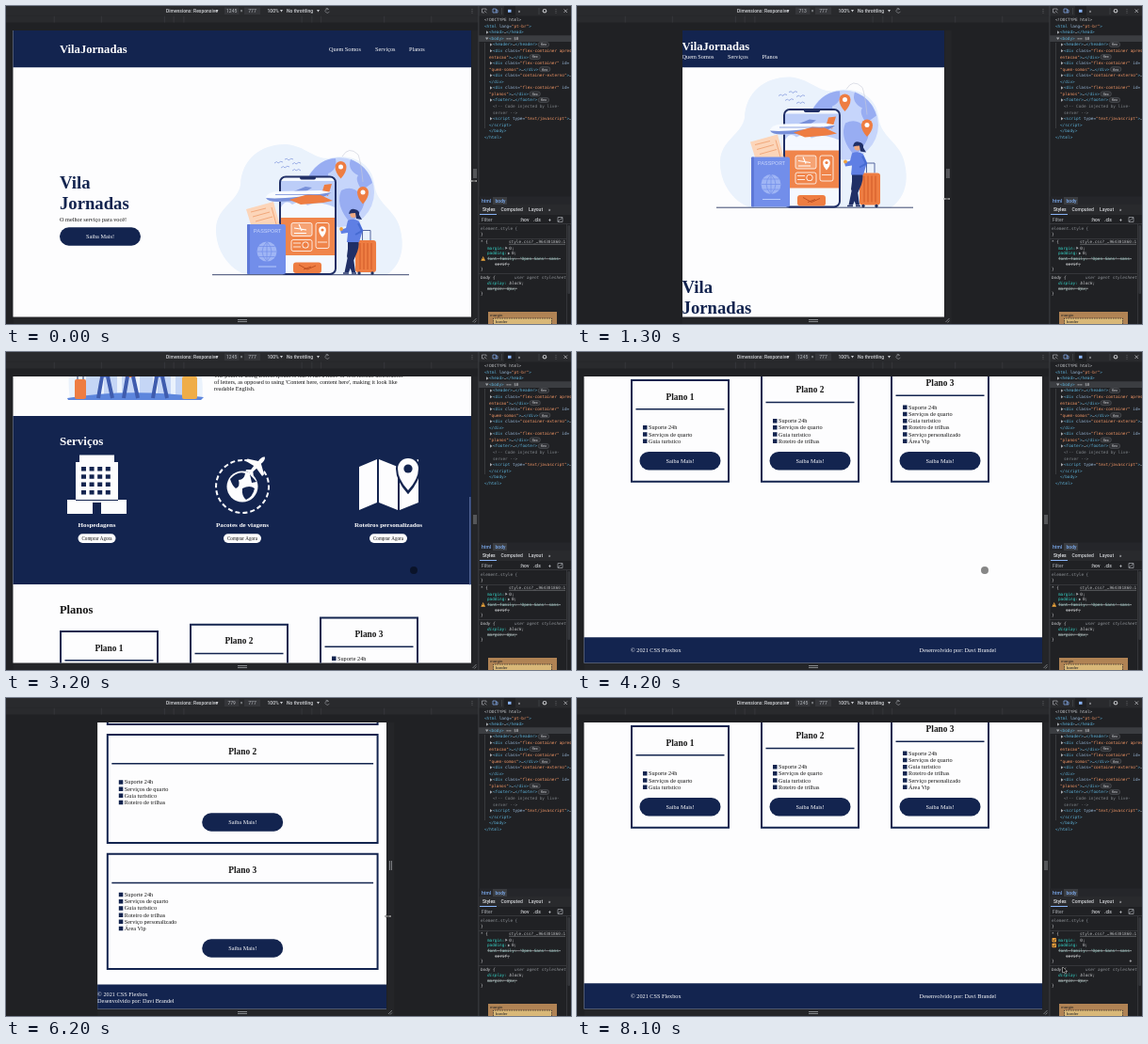
These frames come from a looping animation (600 by 338 pixels, 8200 ms). An HTML page with a canvas:

```html
<!DOCTYPE html>
<html lang="pt-br">
<head>
<meta charset="utf-8">
<title>Layout responsivo</title>
<style>
html, body { margin: 0; width: 100%; height: 100%; overflow: hidden; background: #202124; }
canvas { display: block; }
</style>
</head>
<body>
<canvas id="stage" width="600" height="338"></canvas>
<script>
const ctx = document.getElementById('stage').getContext('2d');
const LOOP = 8200, STEP = 100, CENTER = 251, SCALE = 0.3912, BREAKPOINT = 1000;
const NAVY = '#13244f', WHITE = '#fdfdfe', BLACK = '#151515', ORANGE = '#ee7d42', INK = '#202f66';
const SERIF = '"Liberation Serif", serif', SANS = 'Roboto, sans-serif', MONO = '"DejaVu Sans Mono", monospace';

// Keys: [time, value, ...]
const WIDTHS = [[0, 1245], [150, 1245], [1270, 713], [1350, 713], [2300, 1245], [5000, 1245], [6200, 779], [6450, 690], [7400, 1245], [8200, 1245]];
const SCROLL = [[0, 0], [2700, 0], [3200, 414], [3550, 681], [8200, 681]];
const POINTER = [[0, 497, 186], [1300, 393, 205], [2300, 497, 221], [2500, 492, 222], [2700, 433, 232], [4400, 433, 232], [5000, 497, 232], [7400, 497, 232], [8000, 516, 288], [8200, 516, 288]];

function at(keys, t) {
  const i = Math.max(1, keys.findIndex(k => k[0] > t));
  const a = keys[i - 1], b = keys[i], p = Math.max(0, (t - a[0]) / (b[0] - a[0]));
  return a.slice(1).map((v, n) => v + (b[n + 1] - v) * p);
}

function rect(x, y, w, h, color, r = 0) {
  ctx.fillStyle = color;
  ctx.beginPath();
  ctx.roundRect(x, y, w, h, r);
  ctx.fill();
}
function frame(x, y, w, h, color, lw = 1, r = 0) {
  ctx.strokeStyle = color;
  ctx.lineWidth = lw;
  ctx.beginPath();
  ctx.roundRect(x, y, w, h, r);
  ctx.stroke();
}
function disc(x, y, r, color) {
  ctx.fillStyle = color;
  ctx.beginPath();
  ctx.arc(x, y, r, 0, 7);
  ctx.fill();
}
function fill(d, color) {
  ctx.fillStyle = color;
  ctx.fill(new Path2D(d));
}
function line(d, color, lw = 1) {
  ctx.strokeStyle = color;
  ctx.lineWidth = lw;
  ctx.stroke(new Path2D(d));
}
// y is the visual middle of the line
function text(s, x, y, size, color, font = SERIF, align = 'left', style = '') {
  ctx.font = `${style} ${size}px ${font}`;
  ctx.textAlign = align;
  ctx.fillStyle = color;
  ctx.fillText(s, x, y + size * 0.32);
}
const copy = (s, x, y, color = BLACK, align) => text(s, x, y, 6.26, color, SERIF, align);
const bold = (s, x, y, size, color, align) => text(s, x, y, size, color, SERIF, align, 'bold');
const ui = (s, x, y, color = '#d3d5d9', align) => text(s, x, y, 5, color, SANS, align, '500');
const mono = (s, x, y, color, style) => text(s, x, y, 4.35, color, MONO, 'left', style);

function pin(x, y, r, color, hole) {
  fill(`M${x - r} ${y}A${r} ${r} 0 1 1 ${x + r} ${y}Q${x + r} ${y + r} ${x} ${y + r * 2.1}Q${x - r} ${y + r} ${x - r} ${y}`, color);
  disc(x, y, r * 0.42, hole);
}
function button(cx, cy, w = 86) {
  rect(cx - w / 2, cy - 9.7, w, 19.4, NAVY, 9.7);
  copy('Saiba Mais!', cx, cy, WHITE, 'center');
}

function travelArt(dx, dy) {
  ctx.save();
  ctx.translate(dx, dy);
  fill('M256 286C236 280 222 258 223 236C224 214 246 208 249 190C250 162 272 146 298 147C318 149 326 162 342 162C366 156 388 166 391 188C393 210 410 214 417 232C424 252 422 274 404 286Z', '#eaf2fc');
  line('M219 285.7H428', '#26335f', 0.9);
  disc(354, 198, 37, '#c6d5fb');
  fill('M322 180Q334 162 350 162Q352 174 342 178Q344 188 332 192Q326 190 322 180M366 163Q384 170 389 188L378 196Q370 184 374 180Q362 174 366 163M356 196Q368 190 376 200Q386 206 374 222Q366 234 362 226Q350 210 356 196', '#98adf2');
  line('M357 160Q364 148 374 158Q377 166 379 187', '#c8ccd8', 0.6);
  pin(355.5, 171, 6, ORANGE, WHITE);
  pin(379, 198, 6, ORANGE, WHITE);
  line('M285 167q3 -3 4 0q3 -3 5 -1M296 163q3 -2 4 1q3 -3 5 -1M292 172q3 -3 4 0q3 -3 5 -1M304 168q3 -3 4 0q3 -3 5 -1M304 175q3 -3 4 0q3 -3 5 0', '#7c93dc', 0.7);

  rect(291, 181, 59, 104, '#f4f8ff', 6);
  rect(292, 186, 57, 28, '#bccdf8');
  fill('M292 214Q297 205 304 211Q313 205 320 212Q332 206 349 214V220H292Z', '#f4f8ff');
  rect(292, 225, 57, 40, '#f0854b');
  frame(291, 181.5, 59, 103.5, INK, 2, 6);
  rect(312, 181, 17, 3.5, INK, 1.7);
  rect(303, 230.5, 22, 14, '#f6a374', 2);
  frame(303, 230.5, 22, 14, '#fff', 0.8, 2);
  line('M306 236l13 2M311 232l3 7M306 241.5h13', '#fff', 1.1);
  frame(329, 230.5, 14, 27, '#fff', 0.8, 2);
  pin(336, 238, 3.8, '#fff', ORANGE);
  line('M331 251h10', '#fff', 0.8);
  frame(303, 248.5, 22, 12, '#fff', 0.8, 2);
  disc(318, 254, 3.5, '#fff');
  disc(318, 254, 2.7, ORANGE);
  line('M305 252h8M305 256h8', '#fff', 0.8);
  rect(305, 272.5, 30, 11.5, ORANGE, 3);
  line('M311 275l9 5l9 -4M316 280l8 -3', '#b94c20', 0.9);

  // airliner, nose to the left
  fill('M335 200L338 190L346 189L342 202Z', ORANGE);
  fill('M303 198L318 192L325 193L314 200Z', '#7890da');
  fill('M276 203Q278 198 288 197L334 196L346 198Q338 205 318 207L288 208Q277 208 276 203Z', '#f8fbff');
  fill('M276 204Q296 206 346 198Q338 205 318 207L288 208Q278 208 276 204Z', '#7890da');
  fill('M301 206L321 200L334 201L347 207L337 209L313 211Z', ORANGE);
  line('M286 200.5H332', '#7890da', 0.8);

  fill('M255 216L284 208L291 234L263 242Z', '#fcd5b9');
  line('M260 219l16 -4M262 224l18 -5M282 214l5 18M265 229l18 -5', '#ee9c6b', 0.8);
  rect(256, 232, 41, 53, '#728eea', 2);
  rect(256, 232, 3, 53, '#5d78d7', 1);
  text('PASSPORT', 277.5, 239, 6, '#c5d3fb', SANS, 'center');
  disc(277, 261, 10.5, '#9fb5f5');
  line('M266.5 261h21M277 250.5v21M268.5 255.5h17M268.5 266.5h17M277 250.5q-10 10.5 0 21q10 -10.5 0 -21', '#728eea', 0.7);
  line('M268 277h19', '#b8cbfb', 1);

  line('M378.5 249V238.5H387V249', '#55679f', 1);
  rect(371, 249, 22, 34, ORANGE, 3);
  line('M376 252v28M380 252v28M384 252v28M388 252v28', '#c95222', 0.8);
  disc(375, 284, 1.7, '#26335f');
  disc(389, 284, 1.7, '#26335f');
  fill('M363 249H374Q376 256 371 266L364 283H359.5L363 266ZM364 250H372L369 268L371 283H367L362 266Z', INK);
  fill('M363 228Q369 225 375 229L379 238L375 251H362L363 241L356 242L355 238L361 236Z', '#5f7fe4');
  line('M374 231L378 239L371 243', '#466bd2', 2);
  disc(369, 221.5, 3.6, '#efa981');
  fill('M364 221Q365 215 370 216Q376 217 375 222L378 227L372 226L371 220Q367 220 364 221Z', INK);
  disc(356, 237, 1.9, '#f0a33c');
  line('M358 284h6M367 284h5', INK, 1.7);
  ctx.restore();
}

function aboutSection() {
  bold('Quem Somos', 57, 377, 12.5, NAVY);
  fill('M68 465Q60 410 96 396Q138 380 176 398Q214 420 208 465Z', '#eaf2fc');
  for (let i = 0; i < 6; i++) rect(85 + i * 19, 422 - (i * 13) % 23, 14, 40 + (i * 13) % 23, '#c5d6f6');
  fill('M65 463Q130 452 210 462L207 465H66Z', '#5d86dd');
  rect(73, 443, 12, 21, ORANGE, 2);
  rect(187, 440, 16, 24, '#efad47', 2);
  line('M76 443v-8h6v8M190 440v-8h9v8', '#26335f', 1);
  for (const [x, shirt] of [[105, '#5f7fe4'], [132, ORANGE], [163, '#5f7fe4']]) {
    disc(x, 410, 5, '#efa981');
    rect(x - 7, 416, 14, 25, shirt, 4);
    line(`M${x - 3} 440l-4 23M${x + 3} 440l5 23`, '#3f5cae', 4);
  }
  ["It is a long established fact that a reader will be distracted by the readable",
   'content of a page when looking at its layout.',
   'The point of using Lorem Ipsum is that it has a more-or-less normal distribution',
   "of letters, as opposed to using 'Content here, content here', making it look like",
   'readable English.'
  ].forEach((s, i) => copy(s, 221, 424 + i * 7.3));
}

function servicesSection(L, w) {
  ctx.save();
  ctx.translate(0, 414);
  rect(L, 68, w, 179, NAVY);
  bold('Serviços', 57, 95, 13, WHITE);

  rect(78, 109.5, 37, 9, WHITE);
  rect(74, 117, 45, 42, WHITE);
  rect(65, 157, 63, 15, WHITE);
  for (let i = 0; i < 16; i++) rect(80 + (i % 4) * 8.6, 122 + (i >> 2) * 8.3, 5, 4.5, NAVY);
  rect(92, 160, 9, 12, NAVY);
  line('M74 157.5H119', NAVY, 1);

  ctx.setLineDash([5, 3]);
  line('M251 115a28 28 0 1 0 .1 0', WHITE, 2);
  ctx.setLineDash([]);
  disc(251, 143, 16.5, WHITE);
  fill('M238 135q8 -9 16 -6q-1 7 -7 7q2 7 -3 9q-4 -3 -6 -10M251 145q8 -4 13 0q-2 9 -9 12q-5 -4 -4 -12M259 130l7 8l-5 1z', NAVY);
  ctx.save();
  ctx.translate(266, 121);
  ctx.rotate(0.75);
  disc(0, 0, 10, NAVY);
  fill('M0 -13Q3 -11 2 -5L12 1V4L2 2L1.5 7L5 10V12L0 10.5L-5 12V10L-1.5 7L-2 2L-12 4V1L-2 -5Q-3 -11 0 -13', WHITE);
  ctx.restore();

  fill('M375 122L394 114V160L375 168ZM396 114L416 122V168L396 160ZM418 122L438 114V160L418 168Z', WHITE);
  pin(427, 124, 13, NAVY, NAVY);
  pin(427, 124, 11, WHITE, NAVY);

  [['Hospedagens', 96.5], ['Pacotes de viagens', CENTER], ['Roteiros personalizados', 406]].forEach(([s, x]) => {
    bold(s, x, 184, 7.1, WHITE, 'center');
    rect(x - 20, 193.3, 40, 9.6, WHITE, 4.8);
    text('Comprar Agora', x, 198, 5.1, BLACK, SERIF, 'center');
  });
  ctx.restore();
}

const PERKS = ['Suporte 24h', 'Serviços de quarto', 'Guia turistico', 'Roteiro de trilhas', 'Serviço personalizado', 'Área Vip'];

function planCard(n, x, bottom, w) {
  const count = [3, 4, 6][n - 1], cx = x + w / 2, last = bottom - 44;
  const first = last - (count - 1) * 7.2, top = first - (n === 3 ? 44.3 : 51.3);
  frame(x + 1, top + 1, w - 2, bottom - top - 2, NAVY, 2);
  bold('Plano ' + n, cx, top + 18.5, 9.4, BLACK, 'center');
  rect(x + 5.5, top + 31, w - 11, 1.5, NAVY);
  PERKS.slice(0, count).forEach((s, i) => {
    rect(x + 13, first + i * 7.2 - 2.2, 4.5, 4.5, NAVY);
    copy(s, x + 19, first + i * 7.2);
  });
  button(cx, bottom - 23, Math.min(86, w - 14));
}

function drawPage(w, mobile, scroll, thumb) {
  const L = CENTER - w / 2, R = CENTER + w / 2;
  ctx.save();
  ctx.beginPath();
  ctx.rect(Math.round(L), 26, Math.floor(R) - Math.round(L), 304.5);
  ctx.clip();
  rect(L, 26, w, 305, WHITE);
  ctx.save();
  ctx.translate(0, -scroll);

  rect(L, 26, w, 39.3, NAVY);
  bold('VilaJornadas', mobile ? L : L + 49.5, mobile ? 43 : 46.3, 12.6, WHITE);
  const navX = mobile ? [L, L + 48.5, L + 85] : [R - 151.5, R - 102.5, R - 66.5];
  ['Quem Somos', 'Serviços', 'Planos'].forEach((s, i) => copy(s, navX[i], mobile ? 53.5 : 46, WHITE));

  const x = mobile ? L : L + 49.5, dy = mobile ? 111 : 0;
  travelArt(mobile ? -71 : R - 494.5, mobile ? -71.5 : 0);
  bold('Vila', x, 188 + dy, 18.7, NAVY);
  bold('Jornadas', x, 210 + dy, 18.7, NAVY);
  copy('O melhor serviço para você!', x, 227 + dy);
  button(x + 43, 245 + dy);
  if (!mobile) {
    aboutSection();
    servicesSection(L, w);
    bold('Planos', L + 49.5, 688, 12.5, BLACK);
  }

  ctx.translate(0, 681);
  if (mobile) {
    [29, 155, 289].forEach((bottom, i) => planCard(i + 1, L + 9.7, bottom, w - 19));
    rect(L, 304.5, w, 27, NAVY);
  } else {
    const gap = Math.max(6, (w - 421) / 2), cardW = Math.min(105, (w - 106 - gap * 2) / 3);
    for (let i = 0; i < 3; i++) planCard(i + 1, L + 49.5 + i * (cardW + gap), 138.7, cardW);
    rect(L, 303.3, w, 28, NAVY);
  }
  copy('© 2021 CSS Flexbox', mobile ? L : L + 49.5, mobile ? 314.5 : 317, WHITE);
  copy('Desenvolvido por: Davi Brandel', mobile ? L : R - 49.5, mobile ? 322 : 317, WHITE, mobile ? 'left' : 'right');
  ctx.restore();
  if (thumb) rect(R - 2.5, 26 + scroll * 0.309, 1.5, 94, 'rgba(125,145,200,.6)');
  ctx.restore();
}

function drawFrameTools(w, css) {
  rect(0, 0, 600, 338, '#202124');
  rect(0, 10.5, 502, 7, '#292a2d');
  for (const s of [320, 375, 425, 768, 1024])
    for (const side of [-1, 1]) rect(CENTER + side * s * SCALE / 2, 10.5, 1, 7, '#36373b');
  rect(0, 0, 600, 10.5, '#292a2d');
  ui('Dimensions: Responsive', 170, 5.3);
  rect(232, 1.5, 15.5, 7.5, '#35363a');
  rect(253, 1.5, 17, 7.5, '#35363a');
  ui(Math.round(css), 239.7, 5.3, '#9fa2a7', 'center');
  ui('×', 250.2, 5.3, '#9fa2a7', 'center');
  ui('777', 261.5, 5.3, '#9fa2a7', 'center');
  ui('100%', 277.5, 5.3);
  ui('No throttling', 298, 5.3);
  for (const x of [222.5, 291, 330]) fill(`M${x} 4h3l-1.5 2.6z`, '#c9cbcf');
  line('M343 3.8a2.2 2.2 0 1 0 .3 2M339.7 2.3l2 .4l-.8 1.7', '#8b8e93', 0.7);
  ui('⋮', 495, 5.3, '#c9cbcf', 'center');

  const R = CENTER + w / 2;
  rect(R, 26, 7.5, 312, '#242528');
  rect(CENTER - w / 2, 331, w + 7.5, 7, '#242528');
  line(`M${R + 2.5} 173v10M${R + 4.5} 173v10`, '#a0a2a6', 0.8);
  line('M246 333.5h10M246 335.5h10', '#a0a2a6', 0.8);
  line(`M${R + 1} 336l4 -4M${R + 3} 336.5l2 -2`, '#a0a2a6', 0.7);
}

// [text, x, arrow, badge]
const TREE = [
  ['<!DOCTYPE html>', 508], ['<html lang="pt-br">', 508], ['<head>…</head>', 513, '▶'], ['<body> == $0', 513, '▼'],
  ['<header>…</header>', 517, '▶', 1], ['<div class="flex-container apres', 517, '▶'], ['entacao">…</div>', 513, '', 1],
  ['<div class="flex-container" id=', 517, '▶'], ['"quem-somos">…</div>', 513, '', 1],
  ['<div class="container-externo">…', 517, '▶'], ['</div>', 513],
  ['<div class="flex-container" id=', 517, '▶'], ['"planos">…</div>', 513, '', 1], ['<footer>…</footer>', 517, '▶', 1],
  ['<!-- Code injected by live-', 517], ['server -->', 517], ['<script type="text/javascript">…', 517, '▶'],
  ['<\/script>', 513], ['</body>', 513], ['</html>', 508]
];
const TOKEN = /(^[\w-]+"|"[^"]*"?)|( [\w-]+=)|(…| == \$0)|([^\s"…])/g;
const TOKEN_COLORS = ['#f29766', '#9bbbdc', '#c9cbcf', '#5db0d7'];

function drawTree() {
  rect(502, 31.3, 98, 6.6, '#3b3d41');
  line('M508.5 39V130', '#4b4d51', 0.6);
  TREE.forEach(([s, x, arrow, badge], i) => {
    const y = 14.9 + i * 6.55;
    if (/^<!|-->/.test(s)) mono(s, x, y, i ? '#80868b' : '#c9cbcf');
    else for (const m of s.matchAll(TOKEN)) mono(m[0], x + m.index * 2.62, y, TOKEN_COLORS[m.slice(1).findIndex(Boolean)]);
    if (arrow) fill(arrow === '▶' ? `M${x - 3} ${y - 1.7}l2.5 1.7l-2.5 1.7z` : `M${x - 4} ${y - 1}h3.4l-1.7 2.4z`, '#a8abb0');
    if (badge) {
      const end = x + s.length * 2.62 + 1;
      rect(end, y - 2.6, 11.5, 5, '#2f3034', 2.5);
      frame(end, y - 2.6, 11.5, 5, '#5f6267', 0.5, 2.5);
      text('flex', end + 5.7, y, 4, '#d3d5d9', SANS, 'center');
    }
  });
}

function drawStyles(mobile, hover) {
  const soft = '#8f9398', prop = '#35d4c7', value = '#d3d5d8';
  rect(502, 202.5, 98, 8.5, '#25262a');
  rect(517, 203, 15, 8, '#3b3d41');
  ui('html', 505, 207, '#7cacf0');
  ui('body', 519.5, 207, '#7cacf0');
  rect(502, 211, 98, 11, '#292a2d');
  ui('Styles', 506, 216.5, '#e8eaed');
  ui('Computed', 525.5, 216.5);
  ui('Layout', 555, 216.5);
  ui('»', 576, 216.5);
  rect(503, 221, 18, 1, '#8ab4f8');
  ui('Filter', 505, 227, soft);
  ui(':hov', 546, 227);
  ui('.cls', 560, 227);
  ui('+', 576, 227);
  frame(586, 224.5, 5, 5, '#a8abb0', 0.7);
  line('M586 229l5 -4', '#a8abb0', 0.7);
  line('M502 231.5H600M502 247.5H595M502 284.5H595', '#43454a', 0.6);
  line('M595.5 232V338', '#43454a', 0.6);
  rect(596.5, 233, 2.5, 73, '#36383c', 1);

  mono('element.style {', 504, 236.7, soft);
  mono('}', 504, 243, value);
  mono('* {', 504, 251, value);
  mono('style.css?_…964301860:1', 534, 251, '#b8babd');
  line('M534 253.3H594', '#b8babd', 0.4);
  ['margin', 'padding'].forEach((s, i) => {
    const y = 257.3 + i * 5.8, end = 511 + (s.length + 1) * 2.62;
    mono(s + ':', 511, y, prop);
    mono('0;', end + 5, y, value);
    if (hover) {
      rect(504.5, y - 2.3, 4.5, 4.5, '#f0a13a', 0.8);
      line(`M505.5 ${y}l1 1.2l1.7 -2.6`, '#202124', 0.7);
    } else fill(`M${end + 1} ${y - 1.5}l2.3 1.5l-2.3 1.5z`, '#a8abb0');
  });
  mono("font-family: 'Open Sans' sans-", 511, 268.7, '#8fc9c1');
  mono('serif;', 519, 274.3, value);
  line('M511 268.7H589M519 274.3H535', '#c0c2c5', 0.6);
  if (!mobile && !hover) {
    fill('M506.7 266l2.4 4.7h-4.8z', '#f2a93b');
    line('M506.7 267.5v1.6', '#202124', 0.6);
  }
  mono('}', 504, 280, value);
  if (hover) ui('+', 588, 279, '#c9cbcf', 'center');
  mono('body {', 504, 288.5, value, 'italic');
  mono('user agent stylesheet', 540, 288.5, soft, 'italic');
  mono('display:', 511, 294.7, prop, 'italic');
  mono('block;', 534.5, 294.7, value, 'italic');
  mono('margin: 8px;', 511, 300.3, '#a7c6c2', 'italic');
  line('M511 300.3H543', '#c0c2c5', 0.6);
  mono('}', 504, 306, value);

  rect(512, 325, 73, 13, '#b08354');
  text('margin', 514, 328.7, 4.3, '#202124', SANS);
  rect(517.5, 332, 62, 6, '#d9b878');
  ctx.setLineDash([1.5, 1]);
  line('M517.5 338V332H579.5V338', '#202124', 0.7);
  ctx.setLineDash([]);
  text('border', 520, 336, 4.3, '#202124', SANS);
}

function drawInspector(mobile, hover) {
  rect(501.5, 0, 98.5, 338, '#202124');
  rect(501.5, 0, 98.5, 10.5, '#292a2d');
  rect(501.5, 0, 0.8, 338, '#45474b');
  line('M508 7h-2.5v-4h4.5v1.7M508 5l2.3 2.3', '#a8abb0', 0.7);
  line('M517 3h3.3v4h-3.3zM520.3 4.2h1.7v2.8h-1.7', '#8ab4f8', 0.7);
  line('M526.5 2v7', '#4b4d51', 0.6);
  rect(529, 0, 12, 10.5, '#1f2023');
  rect(533, 3.8, 3.5, 3, '#8ab4f8');
  ui('»', 545, 5, '#c9cbcf', 'center');
  line('M566 2v7', '#4b4d51', 0.6);
  disc(572, 5.2, 2.3, '#b8babd');
  disc(572, 5.2, 1.1, '#292a2d');
  ui('⋮', 584, 5.2, '#c9cbcf', 'center');
  line('M592.5 3.5l3.5 3.5m0 -3.5l-3.5 3.5', '#c9cbcf', 0.7);
  drawTree();
  drawStyles(mobile, hover);
}

function drawPointer(t, css) {
  let [x, y] = at(POINTER, t);
  if (t < 2400 || (t >= 5000 && t < 7500)) {
    x = CENTER + css * SCALE / 2 + 2.5;
    const arrows = `M${x - 2.7} ${y}h5.4M${x - 1.7} ${y - 1}l-1 1l1 1M${x + 1.7} ${y - 1}l1 1l-1 1`;
    line(arrows, '#111', 1.3);
    line(arrows, '#fff', 0.6);
  } else if (t >= 2700 && t <= 4400) {
    disc(x, y, 4, 'rgba(0,0,0,.47)');
  } else {
    const arrow = `M${x} ${y - 2}v6l1.4 -1.3l1 2.1l.9 -.5l-1 -2h2z`;
    line(arrow, '#fff', 0.9);
    fill(arrow, '#111');
  }
}

function draw(now) {
  const t = Math.floor(now % LOOP / STEP) * STEP;
  const [css] = at(WIDTHS, t), [scroll] = at(SCROLL, t);
  // the page trails the size label a little while dragging
  const w = at(WIDTHS, Math.max(0, t - 20))[0] * SCALE;
  const mobile = css < BREAKPOINT;
  drawFrameTools(w, css);
  drawPage(w, mobile, scroll, t > 2700 && t < 4000);
  drawInspector(mobile, t >= 7900);
  drawPointer(t, css);
  requestAnimationFrame(draw);
}
requestAnimationFrame(draw);
</script>
</body>
</html>
```
